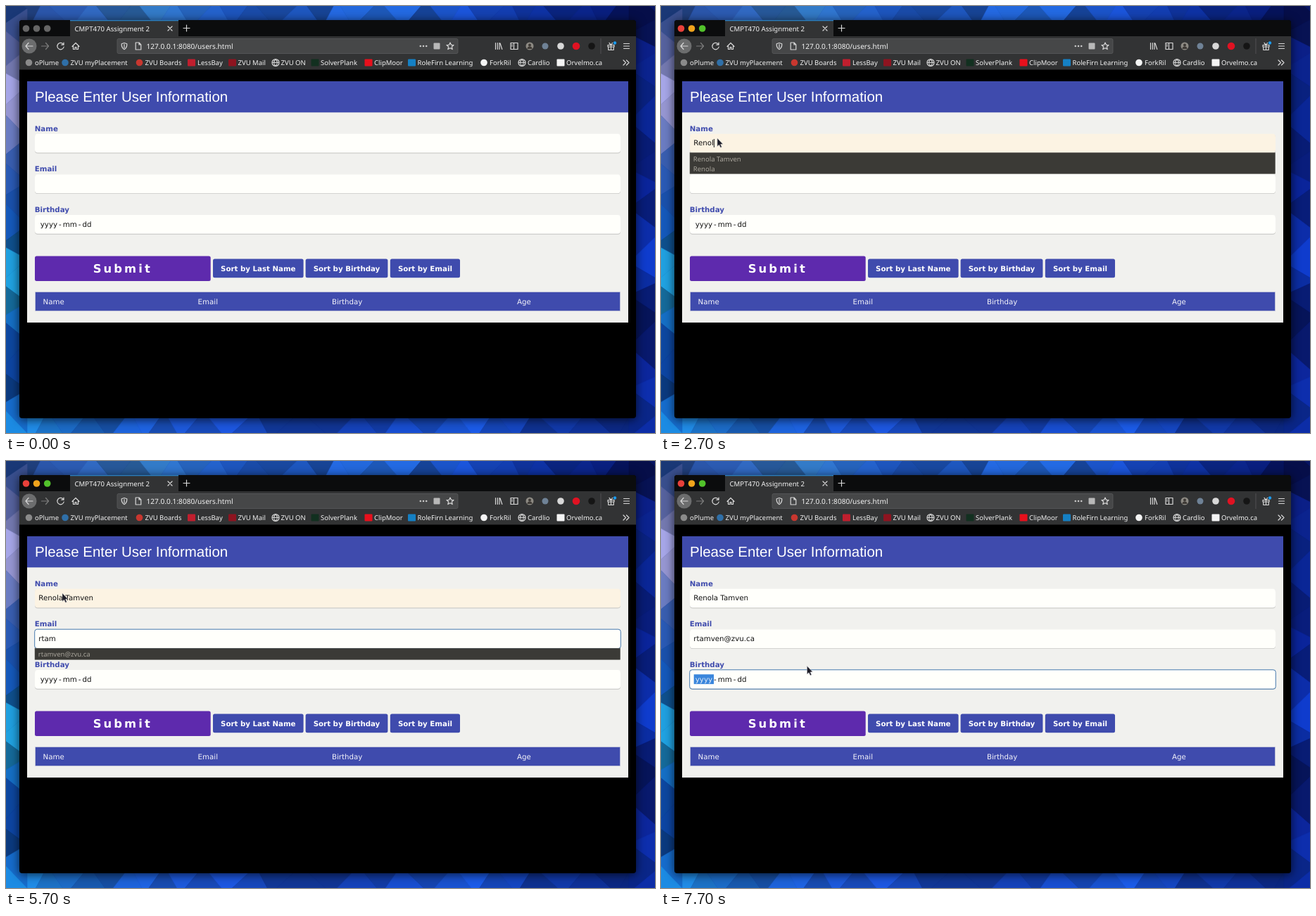
Write an HTML page that moves like this. It is 922 px wide and 607 px high and loops after 8 s.

```html
<!DOCTYPE html>
<html lang="en">
<head>
<meta charset="utf-8">
<title>User form</title>
<style>
html, body { margin: 0; width: 100%; height: 100%; overflow: hidden; background: #0a1c78; }
svg { display: block; width: 100vw; height: 100vh; }
text { white-space: pre; text-rendering: geometricPrecision; }
.ui { font-family: "Noto Sans", "Open Sans", sans-serif; }
.page { font: 10.24px "DejaVu Sans", sans-serif; }
.bold { font-weight: bold; }
.title { font: 20.48px "Liberation Sans", Arial, sans-serif; }
.icon { fill: none; stroke: #d8d8d8; stroke-width: 1.2; stroke-linecap: round; stroke-linejoin: round; }
</style>
</head>
<body>
<svg id="stage" viewBox="0 0 922 607"></svg>
<script>
const LOOP = 8000;
const NAME = 'Renola Tamven';
const EMAIL = 'rtamven@zvu.ca';
const NAMES = [NAME, 'remba sp21', 'remba fa20', 'Remblo FA20', 'Ren', 'Renola'];
const EMAILS = [EMAIL, 'rtobin21@zvu.ca'];
const INDIGO = '#3f4bad';
const FIELD_Y = [181.8, 239.4, 297];

const rect = (x, y, w, h, fill, r = 0, more = '') =>
  `<rect x="${x}" y="${y}" width="${w}" height="${h}" rx="${r}" fill="${fill}" ${more}/>`;
const circle = (x, y, r, fill, more = '') =>
  `<circle cx="${x}" cy="${y}" r="${r}" fill="${fill}" ${more}/>`;
const text = (x, y, str, cls, fill, more = '') =>
  `<text x="${x}" y="${y}" class="${cls}" fill="${fill}" ${more}>${str}</text>`;
const icon = (x, y, d, more = '') =>
  `<path class="icon" transform="translate(${x} ${y})" d="${d}" ${more}/>`;

let seed = 11;
const rnd = () => (seed = (seed * 16807) % 2147483647) / 2147483647;

// One edge of the low-poly wallpaper: zigzag triangles coloured along the stops.
function facets(x, y, w, h, stops) {
  const wide = w > h, len = wide ? w : h, thick = wide ? h : w;
  const colors = stops.split(' ').map(s => [0, 2, 4].map(i => parseInt(s.substr(i, 2), 16)));
  const pt = (a, b) => wide ? [x + a, y + b] : [x + b, y + a];
  const pts = [];
  for (let a = -40, i = 0; a < len + 80; a += 18 + rnd() * 26, i++)
    pts.push(pt(a, i % 2 ? thick + 8 : -8));
  let out = '';
  for (let i = 0; i + 2 < pts.length; i++) {
    const p = i / (pts.length - 2) * (colors.length - 1), k = Math.floor(p), f = p - k;
    const next = colors[Math.min(k + 1, colors.length - 1)], light = 0.78 + rnd() * 0.42;
    const c = colors[k].map((v, j) => Math.min(255, Math.round((v + (next[j] - v) * f) * light)));
    out += `<polygon points="${pts.slice(i, i + 3).join(' ')}" fill="rgb(${c})" stroke="rgb(${c})" stroke-width=".6"/>`;
  }
  return out;
}

function wallpaper() {
  return rect(0, 0, 922, 607, '#0a1c78')
    + facets(0, 0, 922, 22, '2a4f9c 27509e 2f70b4 1a4ba8 1d55bb 2060c8 1646b8 0c2a8e 06135c 050d4a')
    + facets(0, 584, 922, 23, '1a86c8 1d6fc8 1a58c4 1b50c8 1646c0 1440b4 1850c8 123aa8 0d2c90 0c2a94')
    + facets(0, 14, 22, 576, '1d3f86 5a6ab0 8f8fc8 8c8cc4 3c62b8 1d55b4 0f50a8 1f9bd0 1b86c4 0d4aa4 0c3f9a 1565b8 1a8ac8')
    + facets(893, 14, 29, 576, '060f4e 0a1c78 0b2aa0 081a70 0a2498 0d35b4 06145c 0a1f88 0d30a8 0a2590');
}

function bookmarks() {
  const dot = (x, c) => circle(x, 80.5, 4.8, c);
  const box = (x, c) => rect(x - 5.5, 75.5, 11, 10, c, 1);
  const globe = x => icon(x, 80.5, 'M-5 0A5 5 0 1 1 5 0A5 5 0 1 1-5 0M-5 0H5M0-5C-3-2-3 2 0 5C3 2 3-2 0-5', 'stroke-width="1"');
  const list = [
    [41, 'oPlume', dot(32.5, '#8a8a8a')],
    [91.5, 'ZVU myPlacement', dot(84, '#2f6fa8')],
    [197.5, 'ZVU Boards', dot(189.5, '#c8372f')],
    [272, 'LessBay', box(263.5, '#c01f2e')],
    [329.5, 'ZVU Mail', box(321.5, '#8e1420')],
    [390.5, 'ZVU ON', globe(383)],
    [447, 'SolverPlank', box(439, '#123020')],
    [523, 'ClipMoor', box(515, '#e8101c')],
    [584.5, 'RoleFirn Learning', box(576.5, '#1580c4')],
    [687, 'ForkRil', dot(679, '#f4f4f4')],
    [741, 'Cardlio', globe(733)],
    [796, 'Orvelmo.ca', box(788, '#f4f4f4')]
  ];
  return list.map(([x, label, mark]) => mark + text(x, 84, label, 'ui', '#f2f2f2', 'font-size="9.5"')).join('')
    + icon(881, 80.5, 'M-4-3.5L-.5 0L-4 3.5M.5-3.5L4 0L.5 3.5');
}

function browser() {
  return `<g style="filter:drop-shadow(0 2px 7px rgba(0,0,0,.7))">${rect(19, 20, 876, 566, '#000', 4)}</g>`
    + '<path d="M19 43.500V24a4 4 0 0 1 4-4H891a4 4 0 0 1 4 4V43.500Z" fill="#0b0c0d"/>'
    + rect(91, 20, 154, 23.5, '#323334') + rect(91, 20, 154, 1.3, '#2a7fc0')
    + rect(19, 43, 876, 47.5, '#323334')
    + [28.5, 43.5, 58.7].map(x => circle(x, 32, 4.8, '#666', 'class="light"')).join('')
    + text(97.5, 35.6, 'CMPT470 Assignment 2', 'ui', '#f4f4f4', 'font-size="9.650"')
    + icon(233, 32, 'M-3-3L3 3M3-3L-3 3') + icon(256.5, 31.5, 'M-4.500 0H4.500M0-4.500V4.500')
    + circle(33, 57, 10.5, '#6c6d6e')
    + icon(33, 57, 'M5 0H-5M-1-4.500L-5 0L-1 4.500', 'stroke-width="1.6"')
    + icon(55.5, 57, 'M-5 0H5M1-4.500L5 0L1 4.500', 'style="stroke:#7c7c7c"')
    + icon(77.5, 57, 'M4-2.500A4.700 4.700 0 1 0 4.700 1M4.500-5V-1.800H1.300', 'stroke-width="1.5"')
    + icon(99, 57, 'M-5 .5L0-4.500L5 .5M-3.500 0V4.500H-1V1.500H1V4.500H3.500V0')
    + rect(158, 46.5, 484, 21, '#464748', 2, 'stroke="#5a5b5c" stroke-width=".8"')
    + icon(168, 57, 'M0-4.500L3.800-3.300C4 1 2 3.500 0 4.700C-2 3.500-4 1-3.800-3.300ZM0-2.500V2.500')
    + icon(188, 57, 'M-3.800-5H1L3.800-2V5H-3.800ZM1-5V-2H3.800')
    + text(199.5, 60.7, '127.0.0.1:8080/users.html', 'ui', '#f4f4f4', 'font-size="10.150"')
    + [588.8, 593, 597.2].map(x => circle(x, 57, 1.3, '#c8c8c8')).join('')
    + rect(607.5, 52.5, 9, 9, '#b8b8b8', 1)
    + icon(631, 57, 'M0-5L1.500-1.700L5-1.500L2.300 1L3.200 4.600L0 2.700L-3.200 4.600L-2.300 1L-5-1.500L-1.500-1.700Z')
    + icon(700, 57, 'M-4.500-4.500V4.500M-1.700-4.500V4.500M1-4.500V4.500M2-4L4.800 4.500')
    + icon(722, 57, 'M-5-4.500H5V4.500H-5ZM-.5-4.500V4.500M-3.500-2H-2.500M-3.500 0H-2.500')
    + circle(744, 57, 5.5, '#8d8a83') + '<path d="M740.500 61a3.500 3.500 0 0 1 7 0Z" fill="#3d3935"/>' + circle(744, 55.5, 2, '#3d3935')
    + circle(766, 57, 4.5, '#6f8296') + circle(788, 57, 4.8, '#d8d8d8')
    + circle(810, 57, 5.3, '#e01222') + circle(832, 57, 4.8, '#151515')
    + rect(844.5, 46, 1, 22, '#505152')
    + icon(859.5, 57.5, 'M-4.500-2H4.500V.5H-4.500ZM-3.700.5V5H3.700V.5M0-2V5M0-2L-2.500-5M0-2L2-5')
    + circle(865, 52.5, 2.2, '#1c9cf0')
    + icon(881.5, 57, 'M-4-3.500H4M-4 0H4M-4 3.500H4')
    + bookmarks();
}

function button(x, y, w, h, fill, label) {
  return rect(x, y, w, h, fill, 2.5)
    + text(x + w / 2, y + h / 2 + 3.8, label, 'page bold', '#fff', 'text-anchor="middle"');
}

function form() {
  const field = (y, i) => rect(41, y + .7, 832, 27, '#c4c4c2', 4) + rect(41, y, 832, 26.8, '#fffffb', 4, `id="field${i}"`)
    + rect(40.7, y - .2, 832.6, 27.4, 'none', 3.5, `id="focus${i}" stroke="#4679ae"`);
  return rect(30, 107, 854, 343, '#f1f1ee') + rect(30, 107, 854, 44.3, INDIGO)
    + text(41, 136, 'Please Enter User Information', 'title', '#fff')
    + ['Name', 'Email', 'Birthday'].map((s, i) => text(40.8, 177.6 + 57.6 * i, s, 'page bold', INDIGO)).join('')
    + FIELD_Y.map(field).join('')
    + text(46.3, 198.3, '', 'page', '#111', 'id="value0"')
    + text(46.3, 256, '', 'page', '#111', 'id="value1"')
    + rect(46.7, 303.3, 28.3, 13.8, '#3a86dc', 0, 'id="pick"')
    + text(48.8, 313.8, 'yyyy', 'page', '#111', 'id="year"')
    + [[75, '-'], [80.7, 'mm'], [102.8, '-'], [108.6, 'dd']].map(([x, s]) => text(x, 313.8, s, 'page', '#111')).join('')
    + rect(41, 355.5, 249.7, 35.5, '#5e2aad', 2.5)
    + text(123.7, 378.7, 'Submit', 'page bold', '#fff', 'style="font-size:16.400px;letter-spacing:3.070px"')
    + button(294, 359.6, 128.6, 26.6, INDIGO, 'Sort by Last Name')
    + button(425.6, 359.6, 116.8, 26.6, INDIGO, 'Sort by Birthday')
    + button(545.8, 359.6, 99.2, 26.6, INDIGO, 'Sort by Email')
    + rect(41.5, 406.5, 831, 27, INDIGO, 0, 'stroke="#d4d4de" stroke-width=".6"')
    + [[52.6, 'Name'], [272.6, 'Email'], [463, 'Birthday'], [726, 'Age']].map(([x, s]) => text(x, 423.8, s, 'page', '#f4f4fa')).join('');
}

const stage = document.getElementById('stage');
stage.innerHTML = wallpaper() + browser() + form()
  + rect(0, 0, 1, 12, '#111', 0, 'id="caret"')
  + '<g id="popup"></g>'
  + '<path id="arrow" d="M0 0V11.500L2.600 9.200L4.500 13.200L6.300 12.400L4.500 8.600L7.800 8.300Z" fill="#1c1c26" stroke="#c9c9cf" stroke-width=".5"/>'
  + '<path id="beam" d="M-2.500-6Q-.5-6 0-5Q.5-6 2.500-6M0-5V5M-2.500 6Q-.5 6 0 5Q.5 6 2.500 6" fill="none" stroke="#222" stroke-width="1.1"/>';

const $ = id => document.getElementById(id);
const show = (id, on) => $(id).setAttribute('visibility', on ? 'visible' : 'hidden');
const set = (id, attrs) => { for (const k in attrs) $(id).setAttribute(k, attrs[k]); };
const lights = [...document.querySelectorAll('.light')];

// Key press times, one per character; a repeated time types two at once.
const NAME_KEYS = [2100, 2300, 2400, 2500, 2700, 2900, 3300, 3300, 3400, 3600, 3700, 3800, 4000];
const EMAIL_KEYS = [5000, 5200, 5300, 5500];
const PATH = [[500, 109, 7], [600, 109, 7], [1100, 80, 188], [6600, 80, 188], [6700, 81, 211.5],
  [7000, 86, 275], [7400, 86, 275], [7700, 207.5, 291.5]];

const typed = (str, keys, t) => str.slice(0, keys.filter(k => k <= t).length);
const within = (t, a, b) => t >= a && t < b;

function pointerAt(t) {
  const i = PATH.findIndex(p => p[0] > t);
  if (i < 0) return PATH[PATH.length - 1].slice(1);
  if (!i) return PATH[0].slice(1);
  const [t0, x0, y0] = PATH[i - 1], [t1, x1, y1] = PATH[i], f = (t - t0) / (t1 - t0);
  return [x0 + (x1 - x0) * f, y0 + (y1 - y0) * f];
}

function popup(items, y) {
  if (!items.length) return '';
  return rect(41, y, 831.5, 2.5 + 13.6 * items.length, '#3b3a36', 0, 'stroke="#55544f" stroke-width=".5"')
    + items.map((s, i) => text(45.8, y + 12.2 + 13.65 * i, s, 'ui', '#a8a49b', 'font-size="9.5"')).join('');
}

let last = -1;
function render(ms) {
  const t = Math.floor(ms / 100) * 100;
  if (t === last) return;
  last = t;

  const active = t >= 1300;
  lights.forEach((el, i) => el.setAttribute('fill', active ? ['#e8403a', '#f0a41c', '#52c22b'][i] : '#666'));

  const name = typed(NAME, NAME_KEYS, t);
  const email = t >= 7200 ? EMAIL : typed(EMAIL, EMAIL_KEYS, t);
  $('value0').textContent = name;
  $('value1').textContent = email;

  const hover = [within(t, 1100, 6700), within(t, 6700, 7200)];
  hover.forEach((on, i) => set('field' + i, { fill: on ? '#fcf3e3' : '#fffffb' }));
  const birthday = t >= 7600;
  show('focus0', false);
  show('focus1', t >= 4700 && !birthday);
  show('focus2', birthday);
  show('pick', birthday);
  set('year', { fill: birthday ? '#e4eefa' : '#111' });

  const row = t < 4700 ? 0 : 1;
  show('caret', within(t, 1400, 5700));
  set('caret', { x: 46.3 + $('value' + row).getComputedTextLength(), y: row ? 246.8 : 189 });

  const match = (list, s) => list.filter(v => v.toLowerCase().startsWith(s.toLowerCase()));
  $('popup').innerHTML = within(t, 2300, 4700) ? popup(match(NAMES, name), 208.7)
    : within(t, 5200, 7200) ? popup(match(EMAILS, email), 266.2) : '';

  const [x, y] = pointerAt(t);
  const beam = within(t, 1100, 2300) || within(t, 4400, 5200);
  show('beam', beam);
  show('arrow', t >= 500 && !beam);
  for (const id of ['beam', 'arrow']) set(id, { transform: `translate(${x} ${y})` });
}

const start = performance.now();
function tick() {
  render((performance.now() - start) % LOOP);
  requestAnimationFrame(tick);
}
tick();
</script>
</body>
</html>
```
